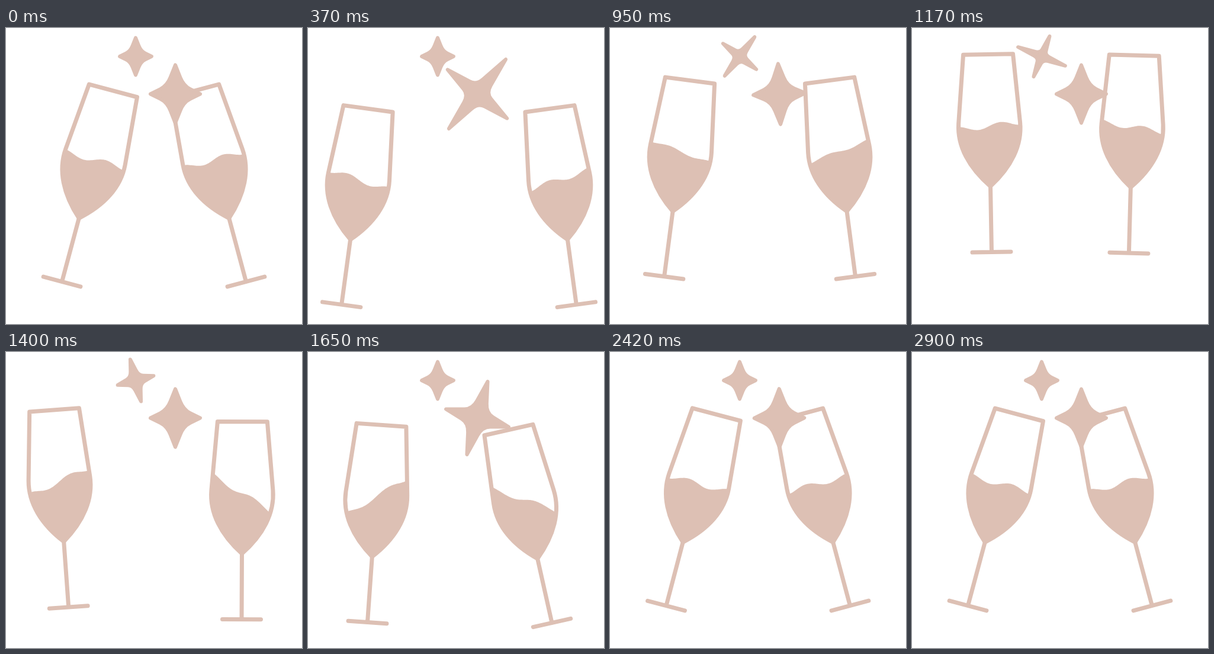
An HTML page with a canvas that plays this animation: 500x500 px, repeating every 2.92 s.

```html
<!DOCTYPE html>
<html lang="en">
<head>
<meta charset="utf-8">
<title>Cheers</title>
<style>
  html, body { margin: 0; width: 100%; height: 100%; overflow: hidden; background: #fff; }
  canvas { display: block; width: 500px; height: 500px; }
</style>
</head>
<body>
<canvas id="stage" width="500" height="500"></canvas>
<script>
const LOOP = 2920;
const INK = '#ddc0b4';
const ctx = document.getElementById('stage').getContext('2d');

// Key poses: time, base x, base y, tilt in degrees, slope of the drink
const rest = [94.5, 428.5, 15, 0];
const poses = [
  [0, ...rest],
  [440, 54, 470, 7.2, 11],         // apart
  [770, 57.5, 457, 12.4, 19],
  [1170, 134.5, 378.5, -1, -5],    // raised
  [1430, 104, 436, -4.2, -20],
  [1650, 100.5, 456.5, 4, -33],    // swinging in
  [1830, 88, 457.5, 12.6, -29],
  [2050, 86, 435.5, 19, 28],       // clink
  [2230, 95.5, 429, 14.4, 1],
  [2600, ...rest]
];

const clamp = x => Math.min(1, Math.max(0, x));

function ease(x) {
  x = clamp(x);
  const half = v => Math.pow(2 * v, 2.5) / 2;
  return x < 0.5 ? half(x) : 1 - half(1 - x);
}

// Smooth interpolation that never overshoots its keys
function sample(keys, t, col) {
  const last = keys.length - 1;
  let i = 0;
  while (i < last - 1 && t >= keys[i + 1][0]) i++;
  const rate = n => (keys[n + 1][col] - keys[n][col]) / (keys[n + 1][0] - keys[n][0]);
  const tangent = n => {
    if (n === 0 || n === last) return 0;
    const a = rate(n - 1), b = rate(n);
    return a * b <= 0 ? 0 : 2 * a * b / (a + b);
  };
  const [p, q] = [keys[i], keys[i + 1]];
  const span = q[0] - p[0];
  const k = clamp((t - p[0]) / span), k2 = k * k, k3 = k2 * k;
  return (2 * k3 - 3 * k2 + 1) * p[col] + (k3 - 2 * k2 + k) * span * tangent(i)
       + (3 * k2 - 2 * k3) * q[col] + (k3 - k2) * span * tangent(i + 1);
}

const bowl = new Path2D(
  'M-42-334L-52-218C-55-180-36-143 0-111C36-143 55-180 52-218L42-334Z');
const foot = new Path2D('M0-111V0M-32.5 0H32.5');

// The ripple flips from side to side and lingers there
const ripple = t => -4.5 * Math.tanh(4 * Math.sin(Math.PI * (t - 200) / 790));

// The right glass moves further out, then swings in ahead of the left one
const spread = t => 10 * ease(t / 370) * (1 - ease((t - 770) / 400));
const lead = t => 180 * ease((t - 1000) / 550);

function drawGlass(t, mirrored) {
  const time = mirrored ? t + lead(t) : t;
  const [x, y, tilt, slope] = [1, 2, 3, 4].map(col => sample(poses, time, col));
  const wave = mirrored ? -ripple(t) : ripple(t);

  ctx.save();
  if (mirrored) {
    ctx.translate(500 + spread(t), 0);
    ctx.scale(-1, 1);
  }
  ctx.translate(x, y);
  ctx.rotate(tilt * Math.PI / 180);
  ctx.lineWidth = 7;
  ctx.stroke(bowl);
  ctx.stroke(foot);

  ctx.clip(bowl);
  ctx.beginPath();
  ctx.moveTo(-60, -100);
  for (let px = -60; px <= 60; px += 2) {
    ctx.lineTo(px, -213 + slope * px / 48 - wave * Math.sin(Math.PI * px / 36));
  }
  ctx.lineTo(60, -100);
  ctx.fill();
  ctx.restore();
}

// Half a turn each time; arms grow and the core pinches midway
const TURN = 1105;
const stars = [
  { x: 286, y: 111.5, size: 1, grow: 0.62, pinch: 0.25, turns: [-26, 1375] },
  { x: 219, y: 48, size: 0.64, grow: 0.37, pinch: 0.5, turns: [561] }
];

function drawStar({ x, y, size, grow, pinch, turns }, t) {
  const start = turns.filter(s => s <= t).pop() ?? turns[0];
  const k = clamp((t - start) / TURN);
  const stretch = ease(2 * Math.min(k, 1 - k));
  const reach = size * (1 + grow * stretch);
  const valley = 14 * size * (1 - pinch * stretch);
  const round = 0.4 - 0.2 * stretch;
  const near = valley * (1 - round);
  const arm = length => valley + (length - valley) * round;
  const tall = 49 * reach, wide = 42 * reach;

  // One quadrant: tip, shoulder, valley, shoulder, tip
  const quadrant = [
    [0, -tall], [near, -arm(tall)], [valley, -valley], [arm(wide), -near], [wide, 0]
  ];

  ctx.save();
  ctx.translate(x, y);
  ctx.rotate(Math.PI * ease(k));
  ctx.lineWidth = 6;
  ctx.beginPath();
  ctx.moveTo(0, -tall);
  for (const [sx, sy] of [[1, 1], [1, -1], [-1, -1], [-1, 1]]) {
    const pts = quadrant.map(([px, py]) => [px * sx, py * sy]);
    if (sx !== sy) pts.reverse();
    ctx.lineTo(...pts[1]);
    ctx.quadraticCurveTo(...pts[2], ...pts[3]);
    ctx.lineTo(...pts[4]);
  }
  ctx.closePath();
  ctx.fill();
  ctx.stroke();
  ctx.restore();
}

function draw(t) {
  ctx.fillStyle = '#fff';
  ctx.fillRect(0, 0, 500, 500);
  ctx.fillStyle = ctx.strokeStyle = INK;
  ctx.lineCap = ctx.lineJoin = 'round';
  drawGlass(t, false);
  drawGlass(t, true);
  stars.forEach(star => drawStar(star, t));
}

const begin = performance.now();
function tick() {
  draw((performance.now() - begin) % LOOP);
  requestAnimationFrame(tick);
}
tick();
</script>
</body>
</html>
```
